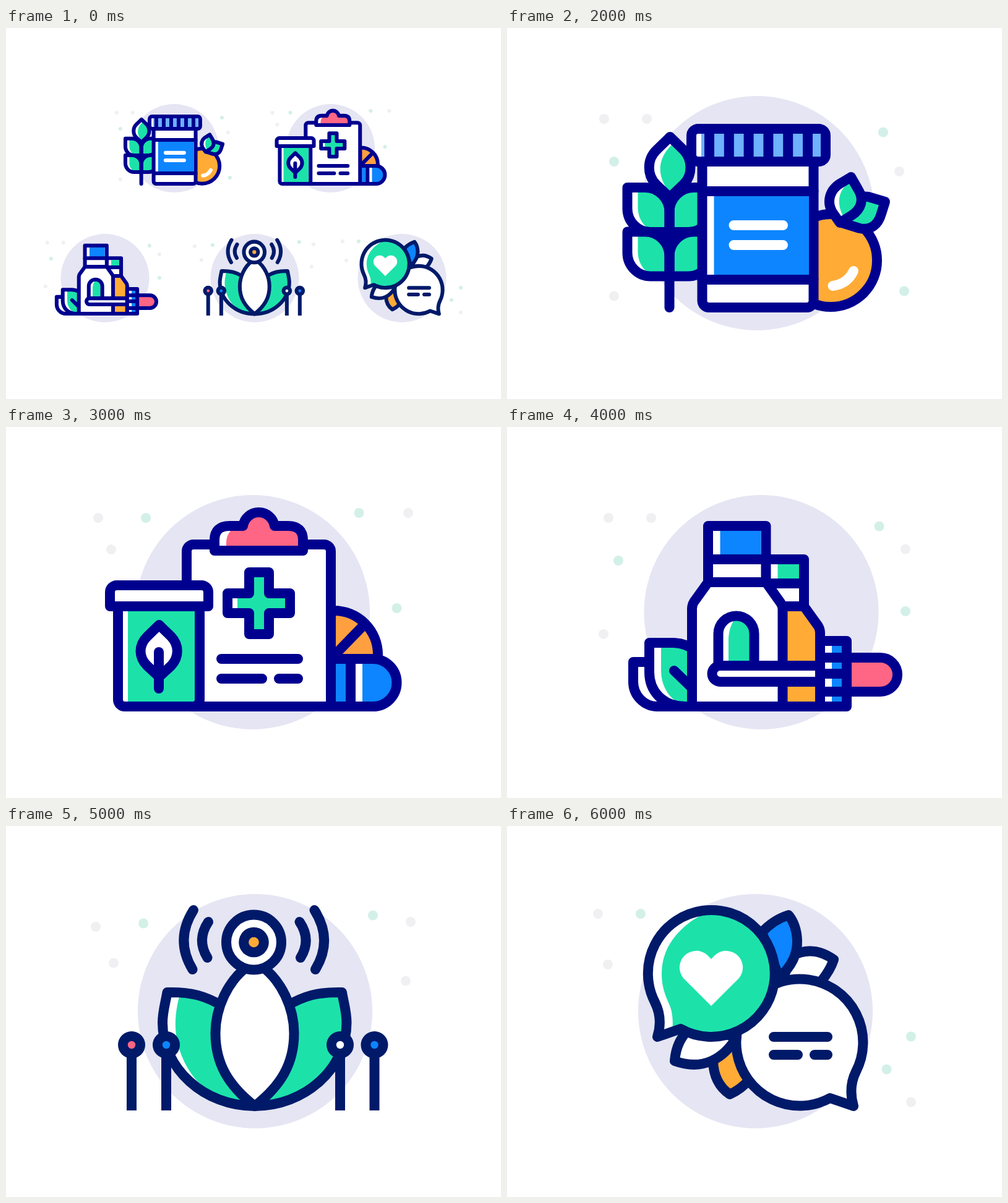
Recreate the animation shown at these times as an HTML page. Size 800 by 600 pixels, loop 7 s.

```html
<!DOCTYPE html>
<html lang="en">
<head>
<meta charset="utf-8">
<title>Wellness icons</title>
<style>
html, body { margin: 0; width: 100%; height: 100%; overflow: hidden; background: #fff; }
svg { display: block; width: 100%; height: 100%; }
</style>
</head>
<body>
<svg id="stage" viewBox="0 0 800 600"></svg>
<script>
const WHITE = '#fff', GREEN = '#1ce2aa', BLUE = '#0d85ff', SKY = '#6db1ff',
  ORANGE = '#ffab36', AMBER = '#ff9f40', PINK = '#ff6584',
  HALO = '#e5e5f3', GREY = '#f0f0f2', MINT = '#d3f0e8',
  NAVY = '#00008f', DEEP = '#001a69';

const disc = (x, y, r, color) => `<circle cx="${x}" cy="${y}" r="${r}" fill="${color}" stroke="none"/>`;
const fill = (d, color) => `<path d="${d}" fill="${color}" stroke="none"/>`;
const line = (d, color = 'none') => `<path d="${d}" fill="${color}"/>`;
const white = d => `<path d="${d}" stroke="#fff"/>`;
const box = (x, y, x2, y2, color) => fill(`M${x} ${y}H${x2}V${y2}H${x}Z`, color);
// White shape with a tinted part and an outline on top
const tinted = (d, part, color) => fill(d, WHITE) + fill(part, color) + line(d);
const flip = (sum, body) => `<g transform="translate(${sum} 0) scale(-1 1)">${body}</g>`;
const dots = (color, list) => list.map(([x, y]) => disc(x, y, 8, color)).join('');

function jar() {
  const leaf = 'M194.5 258H223A39.5 40 0 0 1 262.5 298V330H232A37.5 38 0 0 1 194.5 292Z';
  const tint = 'M211.5 258H223A39.5 40 0 0 1 262.5 298V330H240C221 324 211.5 308 211.5 290Z';
  const pair = flip(525, line(leaf, GREEN)) + tinted(leaf, tint, GREEN);
  let ticks = '';
  for (let i = 0; i < 6; i++) ticks += `M${327 + i * 31.8} 163V216`;
  return pair + `<g transform="translate(0 71.5)">${pair}</g>` +
    tinted('M263.5 176L241 198C226 213 226 238 241 253L263 274L286 252C300 238 300 213 286 198Z',
      'M267 188C242 212 242 240 263 266L286 252C300 238 300 213 286 198L271 184Z', GREEN) +
    line('M262.5 272V452') +
    `<circle cx="523" cy="376" r="75" fill="${ORANGE}"/>` +
    white('M526.5 417Q550 414 560 393') +
    line('M611 281L584 273L572 272L541 315L570 324C588 328 600 318 605 300Z', GREEN) +
    tinted('M556 241L541 250C521 261 516 281 526 298L538 315L557 303C573 293 577 277 568 262Z',
      'M558 246C534 261 531 284 546 310L557 303C573 293 577 277 568 262Z', GREEN) +
    line('M315.5 210H495.5V441a11 11 0 0 1 -11 11H326.5a11 11 0 0 1 -11 -11Z', WHITE) +
    box(334.5, 264, 488, 407, BLUE) +
    line('M315.5 264H495.5M315.5 407H495.5') +
    white('M366.5 319H446M366.5 351H446') +
    `<rect x="298" y="163" width="217" height="53" rx="11" fill="#fff"/>` +
    box(314, 171, 507, 208, SKY) + line(ticks);
}

function clipboard() {
  const clip = 'H383A25.8 25.8 0 0 1 434 160H456Q480 160 480 183V200';
  return line('M530 297A71 71 0 0 1 601 368V375H525V297Z', AMBER) +
    line('M530 370L579 319.5') +
    tinted('M525 375H593a38.5 38.5 0 0 1 0 77H525Z',
      'M576 375H593a38.5 38.5 0 0 1 0 77H576Z', BLUE) +
    box(533, 383, 550, 444, BLUE) + line('M557 375V452') +
    line('M292 452V201a11 11 0 0 1 11 -11H514a11 11 0 0 1 11 11V452Z', WHITE) +
    tinted('M337 200V183Q337 160 361 160' + clip + 'Z', 'M356 200V186Q357 168 374 160' + clip + 'Z', PINK) +
    tinted('M393 235H425V269H459V301H425V335H393V301H358V269H393Z',
      'M393 235H425V269H459V301H425V335H393V301H374V269H393Z', GREEN) +
    line('M348 375H472M348 407H414M441 407H472') +
    tinted('M181 290H313V441a11 11 0 0 1 -11 11H192a11 11 0 0 1 -11 -11Z',
      'M197 290H305V444H197Z', GREEN) +
    line('M313 452H330') +
    line('M168 290V267a11 11 0 0 1 11 -11H316a11 11 0 0 1 11 11V290Z', WHITE) +
    line('M247.5 320L228 339C214 353 214 372 228 386L247.5 404L267 386C280 372 280 353 267 339Z', WHITE) +
    line('M247 364V423');
}

function bottles() {
  return line('M240 380H204V412A39 40 0 0 0 243 452H290Z', WHITE) +
    tinted('M230 349H270Q290 350 305 362V452H288C250 452 230 425 230 397Z',
      'M249 349H270Q290 350 305 362V452H286C262 440 249 420 249 393Z', GREEN) +
    line('M270 394L299 422') +
    line('M418 214H480V290H418Z', WHITE) + box(437.5, 222, 472, 247, GREEN) + line('M418 253H480') +
    line('M430 290H480L503 322Q506 327 506 333V452H430Z', ORANGE) +
    line('M325 160H418.5V251H325Z', WHITE) + box(344.5, 168, 410.5, 208, BLUE) + line('M325 214H418.5') +
    line('M325 251H418.5L442 284Q445.5 289 445.5 295V452H299V294Q299 288 302 283Z', WHITE) +
    tinted('M341.5 386V334.5A29 29 0 0 1 399.5 334.5V386Z',
      'M358 386V342Q359 320 372 306A29 29 0 0 1 399.5 334.5V386Z', GREEN) +
    line('M506 386H344.5A13 13 0 0 0 344.5 412H506Z', WHITE) +
    line('M549 373H603.5A27.5 27.5 0 0 1 603.5 428H549Z', PINK) +
    line('M506 346H549V452H506Z', WHITE) + box(525, 354, 541, 444, BLUE) +
    line('M506 373H549M506 399H549M506 428H549');
}

function lotus() {
  const petal = 'M260.5 269C300 268 322 275 350 291L402 453C320 453 253 392 253 318C253 300 258 285 260.5 269Z';
  const tint = 'M282 269C270 310 270 345 290 385C308 420 335 437 365 445L402 453L350 291C328 277 305 270 282 269Z';
  const waves = line('M303 136Q272.5 184 301.5 232M327 155Q307.5 184 325.5 213');
  const post = (x, color) => `<path d="M${x} 360V460" stroke-linecap="butt"/>` +
    disc(x, 354, 22, DEEP) + disc(x, 354, 6.2, color);
  return flip(803.5, line(petal, GREEN)) + tinted(petal, tint, GREEN) +
    line('M402 453C360 420 338.5 385 338.5 335C338.5 295 358 250 392 226H412C446 250 465.5 295 465.5 335C465.5 385 444 420 402 453Z', WHITE) +
    `<circle cx="400.5" cy="188" r="44.5" fill="#fff"/>` +
    disc(400.5, 188, 24.3, DEEP) + disc(400.5, 188, 8.3, ORANGE) +
    waves + flip(801.5, waves) +
    post(203, PINK) + post(259, BLUE) + post(540, WHITE) + post(595.5, BLUE);
}

function chat() {
  return line('M460 210Q495 192 528 216Q522 235 505 254L445 250Z', WHITE) +
    line('M455 144Q430 152 412 172L440 245Q470 218 469 185Q468 160 455 144Z', BLUE) +
    line('M360 434Q334 416 333 380L368 350L392 410Q378 426 360 434Z', ORANGE) +
    line('M271 380C273 355 282 342 292 330L372 340C350 378 315 396 271 380Z', WHITE) +
    line('M522 440A102.5 102.5 0 1 1 564 397C556 413 554 432 560 453Z', WHITE) +
    line('M431 341H518M431 370H470M497 370H518') +
    tinted('M280.5 328A102.5 102.5 0 1 0 239 285C248 303 249 322 243 341Z',
      'M330 136.5C296 150 250 184 250 238C250 258 254 270 262 288C267 299 269 312 267 333L280.5 328A102.5 102.5 0 1 0 330 136.5Z', GREEN) +
    fill('M330 291L285 246A27 27 0 0 1 323 208L330 215L337 208A27 27 0 0 1 375 246Z', WHITE);
}

// cx: halo centre at full size; at: halo centre in the overview
const icons = [
  { draw: jar, ink: NAVY, cx: 404, at: [272, 194.5],
    grey: [[157, 147], [226, 147], [634, 232], [173, 433.5]],
    mint: [[173, 216], [608, 168.5], [642, 425.5]] },
  { draw: clipboard, ink: NAVY, cx: 398.5, at: [524.5, 194.5],
    grey: [[149, 147], [170, 198], [650, 139]],
    mint: [[226, 147], [570.5, 139], [631.5, 293]] },
  { draw: bottles, ink: NAVY, cx: 411, at: [160, 404.5],
    grey: [[164, 147], [233, 147], [644, 197.5], [156, 335]],
    mint: [[180, 216], [601.5, 160.5], [644, 298]] },
  { draw: lotus, ink: DEEP, cx: 402.5, at: [402, 404.5],
    grey: [[145, 163], [174, 221.5], [654, 155], [646, 250.5]],
    mint: [[222, 157.5], [593, 144.5]] },
  { draw: chat, ink: DEEP, cx: 401.5, at: [640, 404.5],
    grey: [[147, 142], [163, 224], [653, 446.5]],
    mint: [[216, 142], [653, 340.5], [613.5, 393.5]] }
];

const SCALE = 0.3773, MID = 299.5;
const art = icons.map(k =>
  `<g fill="none" stroke="${k.ink}" stroke-width="16" stroke-linecap="round" stroke-linejoin="round">` +
  disc(k.cx, MID, 189.5, HALO) + dots(GREY, k.grey) + dots(MINT, k.mint) + k.draw() + '</g>');
const overview = icons.map((k, i) =>
  `<g transform="translate(${k.at}) scale(${SCALE}) translate(${-k.cx} ${-MID})">${art[i]}</g>`).join('');

const stage = document.getElementById('stage');
stage.innerHTML = [overview, ...art].map(s => `<g>${s}</g>`).join('');
const scenes = [...stage.children];

// The overview holds for two seconds, each icon for one
function update(ms) {
  const now = Math.max(0, Math.floor((ms % 7000) / 1000) - 1);
  scenes.forEach((s, i) => s.setAttribute('display', i === now ? 'inline' : 'none'));
}

const start = performance.now();
function tick() {
  update(performance.now() - start);
  requestAnimationFrame(tick);
}
tick();
</script>
</body>
</html>
```
